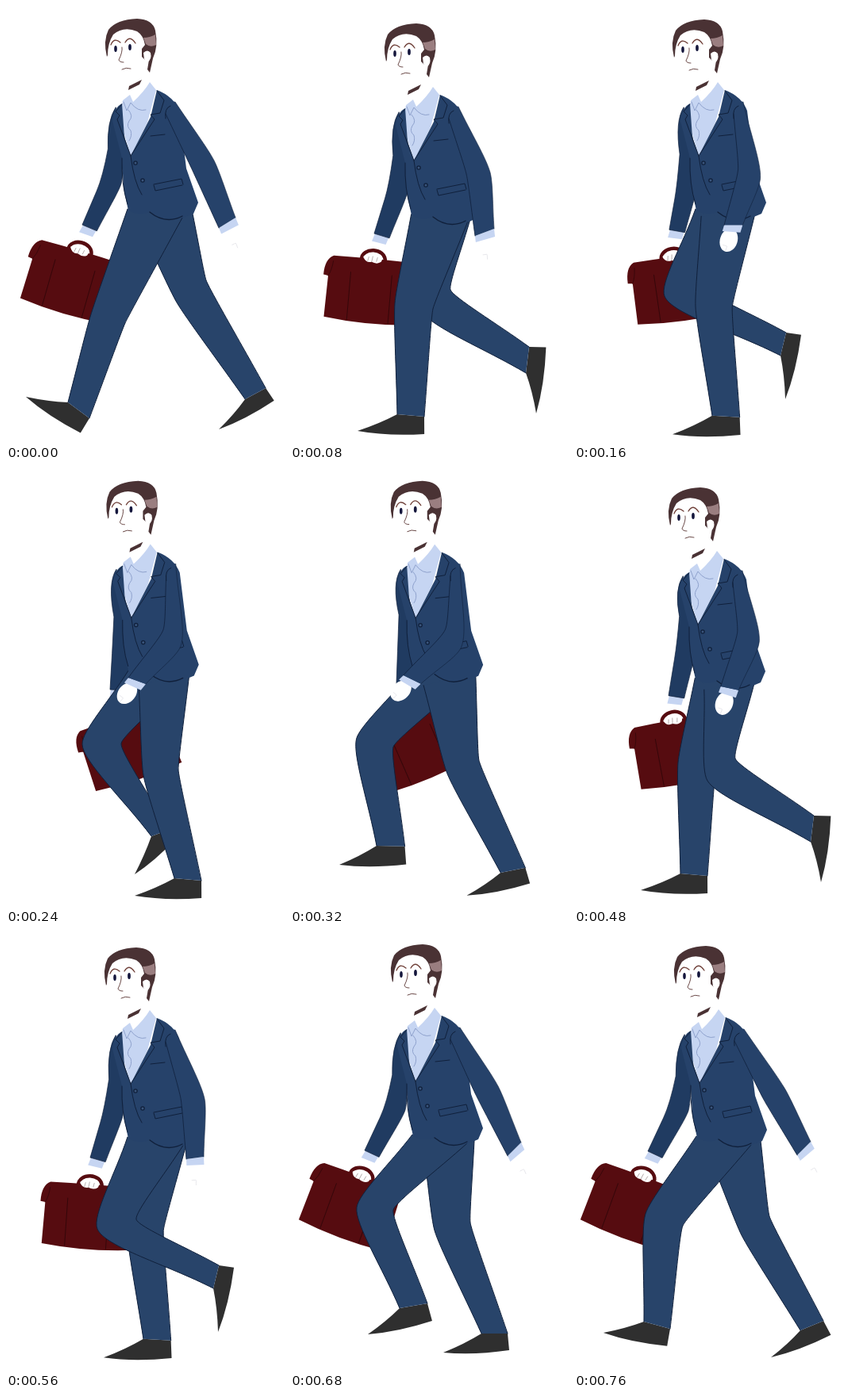
An HTML page with a canvas that plays this animation: 350x550 px, repeating every 800 ms.

```html
<!DOCTYPE html>
<html lang="en">
<head>
<meta charset="utf-8">
<title>Walk cycle</title>
<style>
html, body { margin: 0; width: 100%; height: 100%; overflow: hidden; background: #fff; }
canvas { display: block; }
</style>
</head>
<body>
<canvas id="stage" width="350" height="550"></canvas>
<script>
const ctx = document.getElementById('stage').getContext('2d');
const LOOP = 800, STEP = 40;
const INK = '#10203b', TROUSERS = '#28446a', JACKET = '#26426a', FAR_SLEEVE = '#203b61',
      SHIRT = '#c6d5f2', SHOE = '#2f2f2f', LEATHER = '#560c10', HAIR = '#4a3234';

// Leg poses: phase, then front knee, front ankle, back ankle, back knee, toe.
const LEG = [
  [0, 106, 392, 78, 500, 105, 520, 150, 400, 25, 493],
  [80, 132, 375, 135, 515, 169, 518, 180, 382, 85, 536],
  [240, 173, 385, 212, 515, 246, 518, 217, 378, 162, 537],
  [280, 183, 380, 242, 510, 275, 510, 228, 370, 194, 534],
  [360, 212, 386, 286, 506, 315, 494, 247, 362, 249, 540],
  [400, 216, 380, 302, 502, 328, 488, 253, 352, 269, 540],
  [480, 168, 392, 298, 469, 302, 436, 203, 364, 311, 520],
  [560, 115, 372, 261, 447, 268, 418, 164, 360, 267, 502],
  [640, 97, 352, 184, 468, 206, 460, 146, 351, 163, 516],
  [680, 84, 345, 138, 472, 173, 466, 130, 348, 98, 505],
  [760, 90, 353, 88, 489, 121, 498, 137, 368, 37, 503]
];

// Near arm: time, outer elbow, outer wrist, inner wrist.
const NEAR_ARM = [
  [0, 262, 195, 289, 267, 268, 280],
  [80, 252, 210, 257, 281, 233, 290],
  [240, 220, 222, 176, 270, 154, 262],
  [400, 219, 222, 173, 272, 151, 262],
  [560, 250, 208, 249, 281, 227, 284],
  [680, 262, 192, 291, 263, 274, 280],
  [760, 266, 196, 298, 262, 281, 279]
];

// Far arm: time, outer elbow, outer wrist, handle, case angle in degrees.
const FAR_ARM = [
  [0, 122, 215, 96, 276, 93, 310, 16],
  [80, 125, 225, 106, 287, 105, 320, 5],
  [240, 134, 225, 131, 277, 141, 314, -19],
  [400, 135, 217, 130, 285, 142, 315, -22],
  [560, 124, 220, 106, 282, 106, 317, 4],
  [680, 122, 213, 94, 273, 90, 307, 20],
  [760, 121, 214, 93, 274, 87, 307, 20]
];

// Body bob, twice per loop: phase, torso offset, head offset.
const BOB = [
  [0, 0, 0, 0, 0],
  [80, -1, 6, -6, 6],
  [160, 0, 0, -1, 1],
  [280, 1, -3, 2, -3],
  [360, 1, -1, 1, -1]
];

// Cyclic Hermite interpolation through unevenly spaced keys.
function sample(keys, time, period) {
  const t = time % period, n = keys.length;
  const key = i => {
    const turn = Math.floor(i / n), k = keys[i - turn * n];
    return { t: k[0] + turn * period, v: k.slice(1) };
  };
  let i = n - 1;
  while (keys[i][0] > t) i--;
  const [a, b, c, d] = [key(i - 1), key(i), key(i + 1), key(i + 2)];
  const h = c.t - b.t, u = (t - b.t) / h, u2 = u * u, u3 = u2 * u;
  return b.v.map((p, j) => {
    const q = c.v[j];
    const m = (q - a.v[j]) / (c.t - a.t) * h, w = (d.v[j] - p) / (d.t - b.t) * h;
    return (2 * u3 - 3 * u2 + 1) * p + (u3 - 2 * u2 + u) * m + (3 * u2 - 2 * u3) * q + (u3 - u2) * w;
  });
}

const clamp = x => Math.max(0, Math.min(1, x));
const mix = (a, b, f) => [a[0] + (b[0] - a[0]) * f, a[1] + (b[1] - a[1]) * f];
const add = (a, b, f = 1) => [a[0] + b[0] * f, a[1] + b[1] * f];
const sub = (a, b) => [a[0] - b[0], a[1] - b[1]];
const turn = v => [-v[1], v[0]];
const unit = v => { const l = Math.hypot(...v) || 1; return [v[0] / l, v[1] / l]; };
const pairs = v => v.reduce((out, x, i) => (i % 2 ? out[out.length - 1].push(x) : out.push([x]), out), []);

// Limb edge from a to b, bending round the joint k.
function edge(path, a, k, b, round) {
  const inward = sub(k, a), outward = sub(b, k);
  const dir = unit(add(unit(inward), unit(outward)));
  path.bezierCurveTo(...mix(a, k, 0.4), ...add(k, dir, -round * Math.hypot(...inward)), ...k);
  path.bezierCurveTo(...add(k, dir, round * Math.hypot(...outward)), ...mix(k, b, 0.6), ...b);
}

function edgeLine(a, k, b, round) {
  const path = new Path2D();
  path.moveTo(...a);
  edge(path, a, k, b, round);
  return path;
}

const asPath = p => typeof p === 'string' ? new Path2D(p) : p;
function fill(path, color) {
  ctx.fillStyle = color;
  ctx.fill(asPath(path));
}
function line(path, color = INK, width = 1) {
  ctx.strokeStyle = color;
  ctx.lineWidth = width;
  ctx.stroke(asPath(path));
}
function polygon(points, color) {
  const path = new Path2D();
  points.forEach(p => path.lineTo(...p));
  path.closePath();
  fill(path, color);
}
function dot(x, y, rx, ry, color, angle = 0) {
  ctx.beginPath();
  ctx.ellipse(x, y, rx, ry, angle, 0, Math.PI * 2);
  ctx.fillStyle = color;
  ctx.fill();
}
function shifted(x, y, draw) {
  ctx.save();
  ctx.translate(x, y);
  draw();
  ctx.restore();
}

function drawLeg(phase, bob, shift) {
  const [fk, fa, ba, bk, toe] = pairs(sample(LEG, phase, LOOP)).map(p => add(p, shift));
  const back = clamp((bk[0] - 150) / 100), front = clamp((fk[0] - 130) / 45);
  const fh = add(mix([153, 256], [167, 274], front), bob);
  const bh = add(mix([222, 267], [234, 257], back), bob);

  const ankle = sub(ba, fa), heel = add(add(ba, turn(ankle), 0.64), ankle, 0.06);
  const down = turn(sub(heel, toe));
  const shoe = new Path2D();
  shoe.moveTo(...fa);
  shoe.quadraticCurveTo(...add(mix(fa, toe, 0.45), down, 0.03), ...toe);
  shoe.quadraticCurveTo(...add(mix(toe, heel, 0.45), down, 0.06), ...heel);
  shoe.lineTo(...ba);
  fill(shoe, SHOE);

  const leg = new Path2D();
  leg.moveTo(...fh);
  edge(leg, fh, fk, fa, 0.15);
  leg.lineTo(...ba);
  edge(leg, ba, bk, bh, 0.08);
  leg.closePath();
  fill(leg, TROUSERS);
  line(edgeLine(fh, fk, fa, 0.15));
  line(edgeLine(ba, bk, bh, 0.08));
}

function drawCase(x, y, degrees) {
  shifted(x, y, () => {
    ctx.rotate(degrees * Math.PI / 180);
    line('M-15 1C-16 -15 14 -17 15 1', LEATHER, 4.5);
    fill('M-50 -1Q0 -2 54 0L58 78Q0 84 -56 77L-55 25L-61 24Q-61 4 -50 -1Z', LEATHER);
    line('M-27 18L-27 78M25 18L25 79', '#35070a');
    line('M-55 25Q-51 18 -50 6', '#35070a', 0.8);
    fill('M-13 -3Q-8 -9 8 -7Q13 -4 10 2Q5 6 -2 3Q-10 5 -13 -3Z', '#fff');
    line('M-6 -3L-7 2M-1 -4L-2 3M5 -3L4 2', '#8d8080', 0.6);
  });
}

function drawFarArm(time, bob) {
  const [ex, ey, wx, wy, hx, hy, angle] = sample(FAR_ARM, time, LOOP);
  const elbow = [ex, ey], wrist = [wx, wy], dir = unit(sub(wrist, elbow));
  const across = [dir[1], -dir[0]];
  const inner = add(wrist, across, 20), innerElbow = add(elbow, [23, 9]);
  drawCase(hx, hy, angle);
  polygon([add(wrist, across), add(inner, across, -1), add(add(inner, dir, 9), across, -2), add(wrist, dir, 10)], SHIRT);

  const shoulder = add([138, 128], bob), armpit = add([149, 165], bob);
  const sleeve = new Path2D();
  sleeve.moveTo(...shoulder);
  sleeve.quadraticCurveTo(...add([127, 145], bob), ...mix(shoulder, elbow, 0.6));
  sleeve.quadraticCurveTo(...elbow, ...mix(elbow, wrist, 0.3));
  sleeve.lineTo(...wrist);
  sleeve.lineTo(...inner);
  edge(sleeve, inner, innerElbow, armpit, 0.15);
  sleeve.closePath();
  fill(sleeve, FAR_SLEEVE);
  line(sleeve, INK, 0.7);
}

function drawTorso() {
  fill('M156 112L147 119L145 130L149 162L157 190L178 147L189 106L181 96Q174 108 160 121Z', SHIRT);
  line('M148 121L152 132L157 122Q166 134 176 131M154 131Q161 139 155 145Q151 152 157 157Q159 164 155 170', '#8fa2cd');
  fill('M146 123Q136 128 134 145L146 192L148 230L154 258Q168 266 181 260Q202 278 236 262L242 248L227 205L218 132Q211 114 190 106L182 140L157 189L149 165Z', JACKET);
  line('M190 107L199 119L194 135L182 137L187 143L157 189');
  line('M146 124L138 133L143 138L140 143L157 189');
  line('M157 189Q161 222 171 238M146 192Q145 225 153 250');
  line('M181 260Q201 276 222 265', INK, 1.4);
  line('M182 164L200 162M186 225L221 218L223 225M186 226L188 233L222 226');
  for (const [x, y] of [[163, 198], [172, 220]]) {
    dot(x, y, 2.8, 2.8, INK);
    dot(x, y, 1.5, 1.5, '#3a557c');
  }
}

function drawHead() {
  fill('M154 106L155 101L171 93L168 99Z', HAIR);
  fill('M127 64Q122 44 129 30Q139 17 165 16Q185 17 188 31Q192 51 185 66L181 84L178 80L180 68Q184 57 177 57Q173 58 175 68L171 64L171 54L175 49Q173 37 165 32Q148 25 135 36Q128 47 128 62Z', HAIR);
  fill('M173 40Q181 40 188 36L189 49Q182 53 176 48Z', '#9a7e80');
  fill('M173 59Q178 54 182 59Q184 67 178 71L174 67Z', '#fff');
  line('M132 49Q136 39 144 46M150 46Q156 36 163 47', '#70413a', 1.3);
  dot(138, 54, 1.8, 4, '#14163c');
  dot(156, 52, 1.9, 4, '#14163c');
  line('M146 52Q147 58 142 68Q143 71 148 71M146 80Q151 77 157 79', '#6b4a48');
}

function drawNearArm(time, bob) {
  const [oe, ow, iw] = pairs(sample(NEAR_ARM, time, LOOP));
  const ie = add(oe, turn(unit(sub(ow, oe))), 30);
  const wrist = mix(ow, iw, 0.5), dir = unit(sub(wrist, mix(oe, ie, 0.5)));
  const hand = add(wrist, dir, 20), tip = add(hand, dir, 8);

  dot(...hand, 15, 11, '#fff', Math.atan2(dir[1], dir[0]));
  line(edgeLine(add(tip, turn(dir), 5), tip, add(tip, dir, 6), 0.1), '#dcdce2', 0.7);
  polygon([ow, iw, add(iw, dir, 8), add(ow, dir, 10)], SHIRT);

  const top = add([213, 121], bob), armpit = add([201, 136], bob);
  const sleeve = new Path2D();
  sleeve.moveTo(...add([203, 118], bob));
  sleeve.lineTo(...top);
  edge(sleeve, top, oe, ow, 0.2);
  sleeve.lineTo(...iw);
  edge(sleeve, iw, ie, armpit, 0.15);
  sleeve.closePath();
  fill(sleeve, JACKET);
  line(edgeLine(top, oe, ow, 0.2), INK, 0.6);
  line(edgeLine(iw, ie, armpit, 0.15), INK, 0.8);
  shifted(...bob, () => line('M207 126Q199 129 201 142'));
}

function draw(time) {
  const [tx, ty, hx, hy] = sample(BOB, time, LOOP / 2);
  const bob = [tx, ty];
  ctx.fillStyle = '#fff';
  ctx.fillRect(0, 0, 350, 550);
  ctx.lineCap = ctx.lineJoin = 'round';
  drawFarArm(time, bob);
  drawLeg(time + LOOP / 2, bob, [-1, -6]);
  shifted(tx, ty, () => fill('M154 250L234 255L222 268L172 276Z', TROUSERS));
  drawLeg(time, bob, [0, 0]);
  shifted(tx, ty, drawTorso);
  shifted(hx, hy, drawHead);
  drawNearArm(time, bob);
}

const start = performance.now();
function tick(now) {
  const elapsed = Math.max(0, now - start) % LOOP;
  draw(Math.floor(elapsed / STEP) * STEP);
  requestAnimationFrame(tick);
}
draw(0);
requestAnimationFrame(tick);
</script>
</body>
</html>
```
